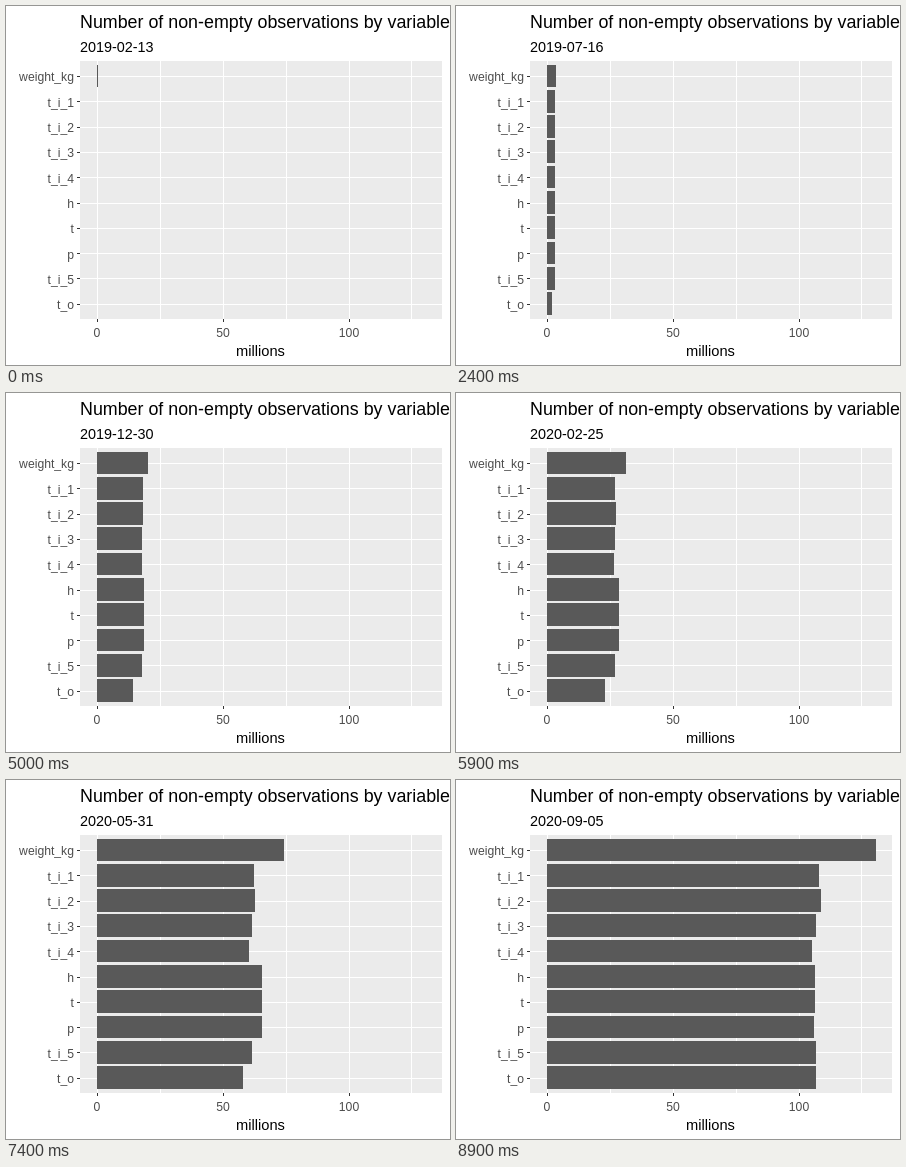
Animation of 444 by 359 pixels, one loop 10000 ms. Source, as an HTML page:

```html
<!DOCTYPE html>
<html lang="en">
<head>
<meta charset="utf-8">
<title>Observations by variable</title>
<style>
  html, body { margin: 0; width: 100%; height: 100%; overflow: hidden; background: #fff; }
  svg { display: block; font-family: "Liberation Sans", Arial, sans-serif; }
  rect { shape-rendering: crispEdges; }
  .axis { font-size: 12.2px; fill: #4d4d4d; }
</style>
</head>
<body>
<svg id="chart" width="444" height="359" viewBox="0 0 444 359"></svg>
<script>
const chart = document.getElementById('chart');
const LEFT = 91, STEP_MS = 100, LOOP_MS = 10000, LAST_STEP = 89, TOTAL_DAYS = 570;
const START = Date.UTC(2019, 1, 13), DAY_MS = 864e5;

// Key points of the longest bar: [step, width in px]
const growth = [[0, 0.5], [24, 9], [41, 30], [59, 79], [66, 115], [74, 187], [89, 329]];

// Width of a bar relative to the longest one, over progress u = 0..1, ending at `end`
const full = () => 1;
const easing = end => u => Math.min(0.93, end + 0.35 * (1 - u) ** 2);
const lateDrop = end => u => 0.93 - (0.93 - end) * u ** 5;
const catchUp = end => u => end * u ** 0.25;

const variables = {
  weight_kg: full,
  t_i_1: easing(0.827),
  t_i_2: easing(0.833),
  t_i_3: easing(0.818),
  t_i_4: easing(0.805),
  h: lateDrop(0.815),
  t: lateDrop(0.815),
  p: lateDrop(0.812),
  t_i_5: easing(0.818),
  t_o: catchUp(0.818),
};

function add(tag, attrs, text = '') {
  const el = document.createElementNS('http://www.w3.org/2000/svg', tag);
  for (const key in attrs) el.setAttribute(key, attrs[key]);
  el.textContent = text;
  return chart.appendChild(el);
}
const rect = (x, y, width, height, fill) => add('rect', { x, y, width, height, fill });
const label = (x, y, text, attrs) => add('text', { x, y, ...attrs }, text);

function slope(i) {
  const [x0, y0] = growth[Math.max(0, i - 1)];
  const [x1, y1] = growth[Math.min(growth.length - 1, i + 1)];
  return (y1 - y0) / (x1 - x0);
}

// Cubic Hermite curve through the key points
function longest(step) {
  const i = Math.max(1, growth.findIndex(([x]) => x >= step));
  const [x0, y0] = growth[i - 1], [x1, y1] = growth[i];
  const h = x1 - x0, u = (step - x0) / h, v = 1 - u;
  return y0 * v * v * (1 + 2 * u) + y1 * u * u * (1 + 2 * v)
    + h * u * v * (v * slope(i - 1) - u * slope(i));
}

const rowY = i => 70.4 + 25.3 * i;
const tickX = value => Math.round(90.9 + value * 2.516);

rect(74, 55, 362, 258, '#ebebeb');
for (let v = 0; v <= 125; v += 25) rect(tickX(v), 55, 1, 258, '#fff');
for (const v of [0, 50, 100]) {
  rect(tickX(v), 313, 1, 3, '#333');
  label(tickX(v), 331, v, { class: 'axis', 'text-anchor': 'middle' });
}
label(74, 22, 'Number of non-empty observations by variable', { 'font-size': 17.85 });
label(254.5, 350, 'millions', { 'font-size': 14.67, 'text-anchor': 'middle' });
const dateText = label(74, 46, '', { 'font-size': 14.4 });

const bars = Object.entries(variables).map(([name, share], i) => {
  const y = rowY(i), line = Math.round(y - 0.35);
  const top = Math.floor(y - 11.38), bottom = Math.floor(y + 11.38);
  rect(74, line, 362, 1, '#fff');
  rect(71, line, 3, 1, '#333');
  label(68, Math.round(y + 5), name, { class: 'axis', 'text-anchor': 'end' });
  return { share, el: rect(LEFT, top, 0, bottom - top, '#595959') };
});

function draw() {
  const step = Math.min(LAST_STEP, Math.floor(performance.now() % LOOP_MS / STEP_MS));
  const progress = step / LAST_STEP, width = longest(step);
  const day = Math.floor(TOTAL_DAYS * progress);
  dateText.textContent = new Date(START + day * DAY_MS).toISOString().slice(0, 10);
  for (const { share, el } of bars) el.setAttribute('width', Math.round(width * share(progress)));
  requestAnimationFrame(draw);
}
draw();
</script>
</body>
</html>
```
